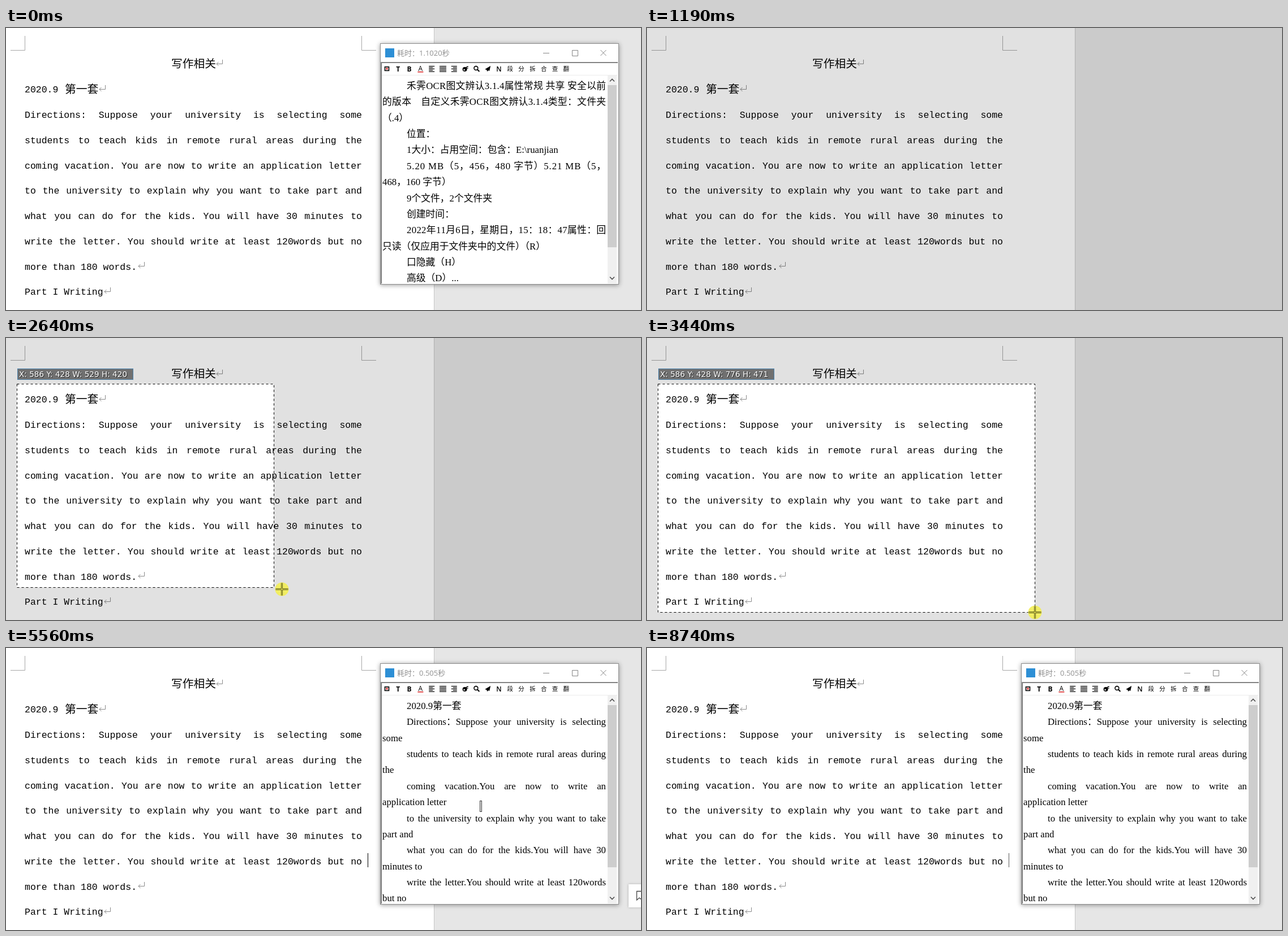
Recreate the animation shown at these times as an HTML page with a canvas. Size 1122 by 499 pixels, loop 8800 ms.

```html
<!DOCTYPE html>
<html lang="zh-CN">
<head>
<meta charset="utf-8">
<title>Screen text recognition</title>
<style>
html, body { margin: 0; width: 100%; height: 100%; overflow: hidden; background: #fff; }
canvas { display: block; width: 1122px; height: 499px; }
</style>
</head>
<body>
<canvas id="stage" width="1122" height="499"></canvas>
<script>
const W = 1122, H = 499, LOOP = 8800, STEP = 66.15;
const ctx = document.getElementById('stage').getContext('2d');

const CJK = '"Noto Sans CJK SC", "Noto Sans CJK", sans-serif';
const MONO = '16.5px "Liberation Mono", monospace';
const SONG = '19.8px ' + CJK;
const BODY = '16.8px "Liberation Serif", ' + CJK.replace('sans-serif', 'serif');
const TITLE = '13px "Open Sans", ' + CJK;

const T = {
  close: 920, dim: 1190, enter: 1250, press: 2180, release: 3640,
  result: 4250, caret: 4300, leave: 7560, end: 8740
};

const ESSAY = [
  'Directions: Suppose your university is selecting some',
  'students to teach kids in remote rural areas during the',
  'coming vacation. You are now to write an application letter',
  'to the university to explain why you want to take part and',
  'what you can do for the kids. You will have 30 minutes to',
  'write the letter. You should write at least 120words but no'
];

// '>' marks an indented line, a trailing '|' a justified one
const FIRST = [
  '>禾霁OCR图文辨认3.1.4属性常规 共享 安全以前|',
  '的版本　自定义禾霁OCR图文辨认3.1.4类型：文件夹|',
  '（.4）',
  '>位置：',
  '>1大小：占用空间：包含：E:\\ruanjian',
  '>5.20 MB（5，456，480 字节）5.21 MB（5，|',
  '468，160 字节）',
  '>9个文件，2个文件夹',
  '>创建时间：',
  '>2022年11月6日，星期日，15：18：47属性：回|',
  '只读（仅应用于文件夹中的文件）（R）',
  '>口隐藏（H）',
  '>高级（D）...'
];
const SECOND = [
  '>2020.9第一套',
  '>Directions：Suppose your university is selecting|', 'some',
  '>students to teach kids in remote rural areas during|', 'the',
  '>coming vacation.You are now to write an|', 'application letter',
  '>to the university to explain why you want to take|', 'part and',
  '>what you can do for the kids.You will have 30|', 'minutes to',
  '>write the letter.You should write at least 120words|', 'but no'
];

// Pointer paths: [time, x, y]
const AIM = [[1250, 250, 515], [1500, 190, 330], [1800, 70, 140], [2050, 21, 83]];
const DRAG = [
  [2180, 21, 83], [2250, 62, 145], [2450, 262, 345], [2645, 473, 441],
  [2850, 570, 462], [3040, 627, 473], [3300, 672, 482], [3420, 685, 485]
];
const ROAM = [
  [3640, 685, 485], [3700, 683, 479], [3960, 680, 472], [4250, 720, 425],
  [4600, 850, 210], [4900, 936, 80], [5000, 936, 72], [5300, 885, 175],
  [5556, 839, 280], [5900, 838, 255], [6300, 765, 9], [6500, 755, 12],
  [6800, 790, 52], [7150, 1030, 230], [7400, 1070, 420], [7540, 1072, 505]
];

function rect(x, y, w, h, color) {
  ctx.fillStyle = color;
  ctx.fillRect(x, y, w, h);
}

function line(points, color, width = 1, close = false) {
  ctx.beginPath();
  points.forEach(([x, y]) => ctx.lineTo(x, y));
  if (close) ctx.closePath();
  ctx.strokeStyle = color;
  ctx.lineWidth = width;
  ctx.stroke();
}

function disc(x, y, rx, color, ry = rx) {
  ctx.beginPath();
  ctx.ellipse(x, y, rx, ry, 0, 0, 7);
  ctx.fillStyle = color;
  ctx.fill();
}

function text(str, x, y, font, color = '#000', align = 'left') {
  ctx.font = font;
  ctx.fillStyle = color;
  ctx.textAlign = align;
  ctx.fillText(str, x, y);
}

function justify(str, x, right, y, font) {
  ctx.font = font;
  const byWord = !/[\u4e00-\u9fff]/.test(str);
  const parts = byWord ? str.split(' ') : [...str];
  const widths = parts.map(p => ctx.measureText(p).width);
  const gap = (right - x - widths.reduce((a, b) => a + b)) / (parts.length - 1);
  parts.forEach((p, i) => {
    text(p, x, y, font);
    x += widths[i] + gap;
  });
}

function along(path, t) {
  if (t <= path[0][0]) return path[0].slice(1);
  for (let i = 1; i < path.length; i++) {
    const [t0, x0, y0] = path[i - 1], [t1, x1, y1] = path[i];
    if (t <= t1) {
      const k = (t - t0) / (t1 - t0);
      return [x0 + (x1 - x0) * k, y0 + (y1 - y0) * k];
    }
  }
  return path[path.length - 1].slice(1);
}

function returnMark(x, y) {
  line([[x + 11.5, y - 6], [x + 11.5, y + 1.5], [x + 1, y + 1.5]], '#8a8a8a');
  line([[x + 4.5, y - 2], [x + 1, y + 1.5], [x + 4.5, y + 5]], '#8a8a8a');
}

function drawPage() {
  rect(0, 0, W, H, '#e6e6e6');
  rect(0, 0, 756, H, '#fff');
  rect(756, 0, 1, H, '#c6c6c6');
  line([[8, 39.5], [33.5, 39.5], [33.5, 14]], '#a8a8a8');
  line([[654, 39.5], [628.5, 39.5], [628.5, 14]], '#a8a8a8');

  text('写作相关', 292, 70, SONG);
  returnMark(371, 62);
  text('2020.9', 33, 113.5, MONO);
  text('第一套', 104, 114.5, SONG);
  returnMark(164, 107);
  ESSAY.forEach((s, i) => justify(s, 33, 629, 159 + i * 44.75, MONO));
  text('more than 180 words.', 33, 427.5, MONO);
  returnMark(233, 420);
  text('Part I Writing', 33, 472, MONO);
  returnMark(173, 465);
}

function drawTools() {
  const at = i => 673 + i * 19.8, y = 72;
  ctx.strokeStyle = '#000';
  ctx.lineWidth = 1.6;
  ctx.strokeRect(669.5, 68.8, 7, 6.6);
  rect(671.5, 70.5, 3, 3, '#d22');
  const bold = 'bold 12px "Open Sans", sans-serif';
  text('T', at(1), 76.5, bold, '#000', 'center');
  text('B', at(2), 76.5, bold, '#000', 'center');
  text('A', at(3), 76, '12px "Open Sans", sans-serif', '#000', 'center');
  rect(at(3) - 5, 77, 10, 1.5, '#d22');
  for (let r = 0; r < 5; r++) {
    const short = r % 2 ? 3 : 0, top = 67 + r * 2.4;
    rect(at(4) - 5, top, 10 - short, 1.2, '#000');
    rect(at(5) - 6, top, 12, 1.2, '#000');
    rect(at(6) - 5 + short, top, 10 - short, 1.2, '#000');
  }
  disc(at(7) - 1, y + 1, 4, '#000');
  disc(at(7) - 2, y + 2, 1.3, '#fff');
  line([[at(7) + 1, y - 2], [at(7) + 5, y - 4]], '#000', 1.5);
  line([[at(7) + 2, y], [at(7) + 5, y - 1]], '#000', 1.2);
  ctx.beginPath();
  ctx.arc(at(8) - 1, y - 1, 3.4, 0, 7);
  ctx.lineWidth = 1.6;
  ctx.stroke();
  line([[at(8) + 1.5, y + 1.5], [at(8) + 5, y + 5]], '#000', 2);
  ctx.beginPath();
  [[5, -5], [-5, 1], [-2, 2], [-1, 5], [1, 3], [3, 4]].forEach(
    ([dx, dy]) => ctx.lineTo(at(9) + dx, y + dy));
  ctx.fillStyle = '#000';
  ctx.fill();
  text('N', at(10), 76.5, '600 12px "Open Sans", sans-serif', '#000', 'center');
  [...'段分拆合查翻'].forEach((c, i) =>
    text(c, at(11 + i), 76, '10.5px ' + CJK, '#000', 'center'));
}

function drawWindow(title, lines) {
  ctx.save();
  ctx.shadowColor = 'rgba(0,0,0,.4)';
  ctx.shadowBlur = 8;
  ctx.shadowOffsetY = 1;
  rect(661, 27, 422, 427, '#8d8d8d');
  ctx.restore();
  rect(662, 28, 420, 425, '#fff');

  rect(670, 36, 16, 16, '#2d8fd5');
  text(title, 691, 49, TITLE, '#909090');
  line([[949, 44.5], [960, 44.5]], '#858585');
  line([[1000.5, 39.5], [1010.5, 39.5], [1010.5, 49.5], [1000.5, 49.5]], '#858585', 1, true);
  line([[1050.5, 39], [1060.5, 49]], '#858585');
  line([[1060.5, 39], [1050.5, 49]], '#858585');

  rect(662, 60, 419, 1, '#a0a0a0');
  rect(662, 61, 419, 1, '#696969');
  rect(662, 60, 1, 393, '#a0a0a0');
  rect(663, 61, 1, 391, '#696969');
  rect(664, 83, 416, 1, '#ececec');
  drawTools();

  rect(1063, 84, 16, 368, '#f0f0f0');
  rect(1063, 101, 16, 287, '#cdcdcd');
  line([[1067, 94.5], [1071, 90.5], [1075, 94.5]], '#505050', 1.6);
  line([[1067, 440.5], [1071, 444.5], [1075, 440.5]], '#505050', 1.6);

  ctx.save();
  ctx.beginPath();
  ctx.rect(664, 84, 399, 368);
  ctx.clip();
  lines.forEach((s, i) => {
    const x = s[0] === '>' ? 708 : 665, y = 108 + i * 28.37;
    const body = s.replace(/^>|\|$/g, '');
    if (s.endsWith('|')) justify(body, x, 1060, y, BODY);
    else text(body, x, y, BODY);
  });
  ctx.restore();
}

function drawDim(box) {
  ctx.beginPath();
  ctx.rect(0, 0, W, H);
  if (box) ctx.rect(...box);
  ctx.fillStyle = 'rgba(0,0,0,.118)';
  ctx.fill('evenodd');
}

function drawCross(x, y, pressed) {
  if (pressed) disc(x, y, 12, 'rgba(243,238,84,.9)');
  const tint = pressed ? '#f3ee54' : '#e8e8e8';
  for (const [color, width] of [['#55551c', 3], [tint, 1]]) {
    line([[x - 11, y], [x + 11, y]], color, width);
    line([[x, y - 11], [x, y + 11]], color, width);
  }
}

function drawSelection(t) {
  const [x, y] = along(DRAG, t).map(Math.round);
  const w = x - 19, h = y - 81;
  drawDim([19, 81, w, h]);
  ctx.setLineDash([4, 4]);
  ctx.strokeStyle = '#000';
  ctx.lineWidth = 1;
  ctx.strokeRect(19.5, 81.5, w, h);
  ctx.setLineDash([]);

  rect(20, 54, 205, 20, '#707070');
  ctx.strokeStyle = '#4d83ad';
  ctx.strokeRect(20.5, 54.5, 204, 19);
  const scaled = v => Math.round(v * 1.1655);
  const label = `X: 586 Y: 428 W: ${scaled(w)} H: ${scaled(h)}`;
  const font = '13.6px "DejaVu Sans", sans-serif';
  text(label, 24, 70, font, '#222');
  text(label, 23, 69, font, '#fff');

  const [cx, cy] = along(DRAG, t + 30);
  drawCross(Math.round(cx) + 0.5, Math.round(cy) + 0.5, true);
}

function drawPointer(t) {
  const [x, y] = along(ROAM, t).map(Math.round);
  const overText = t > T.result && x > 664 && x < 1063 && y > 84 && y < 452;
  if (overText) {
    rect(x - 2, y - 10, 4, 20, '#404040');
    rect(x - 1, y - 9, 2, 18, '#ddd');
    return;
  }
  const shape = [[0.5, 0], [0.5, 14], [7, 16.5], [11.5, 9.5]].map(([a, b]) => [x + a, y + b]);
  line(shape, '#333', 2, true);
  ctx.fillStyle = '#fff';
  ctx.fill();
}

function drawBookmark() {
  ctx.save();
  ctx.shadowColor = 'rgba(0,0,0,.25)';
  ctx.shadowBlur = 4;
  rect(1100, 418, 30, 41, '#fff');
  ctx.restore();
  line([[1124, 430.5], [1114.5, 430.5], [1114.5, 446], [1119, 442], [1124, 446]], '#444', 1.3);
}

function caretAlpha(t) {
  if (t < T.caret) return 0;
  if (t >= T.end) return 0.65;
  const phase = (t - T.caret) % 1060;
  if (phase < 60) return 0.5;
  if (phase < 530) return 1;
  return phase < 590 ? 0.5 : 0;
}

function draw(t) {
  const s = T.dim + STEP * Math.floor((t - T.dim + 10) / STEP);
  drawPage();
  if (t < T.close) {
    drawWindow('耗时：1.1020秒', FIRST);
  } else if (t >= T.dim && t < T.press) {
    drawDim();
    if (t >= T.enter) {
      const [x, y] = along(AIM, s).map(Math.round);
      drawCross(x + 0.5, y + 0.5, false);
    }
  } else if (t >= T.press && t < T.release) {
    drawSelection(s);
  } else if (t >= T.release) {
    if (t < T.result) {
      disc(310, 138, 33, '#0c0806', 32);
    } else {
      drawWindow('耗时：0.505秒', SECOND);
      if (t >= T.caret && t < T.end) drawBookmark();
    }
    rect(639, 363, 1, 25, `rgba(0,0,0,${caretAlpha(t)})`);
    if (t < T.leave) drawPointer(s);
  }
}

const start = performance.now();
function tick() {
  draw((performance.now() - start) % LOOP);
  requestAnimationFrame(tick);
}
tick();
</script>
</body>
</html>
```
